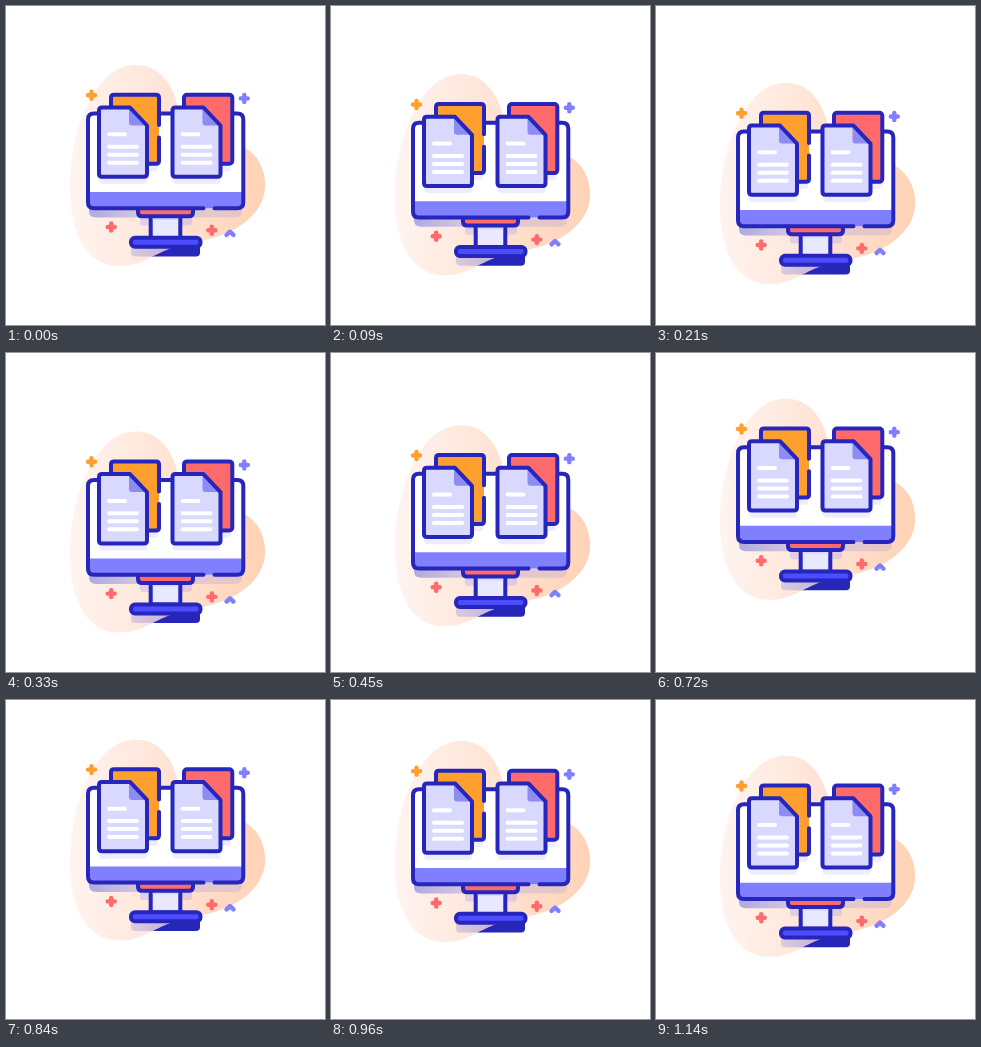
Write an HTML page that moves like this. It is 319 px wide and 319 px high and loops after 1.17 s.

```html
<!DOCTYPE html>
<html lang="en">
<head>
<meta charset="utf-8">
<title>Floating monitor</title>
<style>
  html, body { margin: 0; width: 100%; height: 100%; overflow: hidden; background: #fff; }
  svg { display: block; width: 100vw; height: 100vh; }
  .ink { stroke: #2626bc; stroke-width: 4; stroke-linecap: round; stroke-linejoin: round; }
  .line { fill: none; }
  .text { fill: none; stroke: #fff; stroke-width: 4; stroke-linecap: round; }
  .mark { fill: none; stroke-width: 4.4; stroke-linecap: round; stroke-linejoin: round; }
  .shade { fill: #8080ff; opacity: .24; }
  .faint { fill: #8080ff; opacity: .14; }
</style>
</head>
<body>
<svg viewBox="0 0 319 319" xmlns="http://www.w3.org/2000/svg">
  <defs>
    <linearGradient id="peach" gradientUnits="userSpaceOnUse" x1="64" y1="0" x2="259" y2="0">
      <stop offset="0" stop-color="#fff4f0"/>
      <stop offset=".45" stop-color="#ffe5d8"/>
      <stop offset="1" stop-color="#ffd2b5"/>
    </linearGradient>
    <linearGradient id="cast">
      <stop offset="0" stop-color="#8484d8" stop-opacity=".65"/>
      <stop offset=".4" stop-color="#8484e0" stop-opacity=".28"/>
      <stop offset="1" stop-color="#8484e0" stop-opacity=".2"/>
    </linearGradient>
    <linearGradient id="floor">
      <stop offset="0" stop-color="#8484e0" stop-opacity=".3"/>
      <stop offset=".6" stop-color="#8484d0" stop-opacity=".5"/>
    </linearGradient>
    <path id="blob" d="M130 59C155 59 169 82 173 107C178 132 214 130 238 141.500C251 148 259 162 259 179C259 202 241 219 217 228.500C203 234 184 237 171 240.500C149 246.500 137 260 113 260C78 260 64 222 64 183C64 128 87 59 130 59Z"/>
    <clipPath id="inside"><use href="#blob"/></clipPath>
    <path id="page" d="M96 101.500H124L141 119.500V167.800Q141 170.800 138 170.800H96Q93 170.800 93 167.800V104.500Q93 101.500 96 101.500Z"/>
    <g id="sheet">
      <path class="faint" d="M93 168H141V174Q141 178 137 178H97Q93 178 93 174Z"/>
      <use href="#page" fill="#d9d9ff"/>
      <path fill="#8c8cf4" d="M123 101.500V116.500Q123 119.500 126 119.500H141L124 101.500Z"/>
      <use href="#page" class="ink line"/>
      <path class="text" d="M103 128.300H119M103 140.700H131M103 148.700H131M103 156.700H131"/>
    </g>
  </defs>
  <g id="scene">
    <use href="#blob" fill="url(#peach)"/>

    <rect x="125" y="234" width="69" height="16.500" rx="4" fill="#2626b8"/>
    <g clip-path="url(#inside)">
      <use href="#blob" fill="url(#peach)"/>
      <rect x="125" y="234" width="69" height="16.500" rx="4" fill="url(#floor)"/>
    </g>

    <path fill="url(#cast)" d="M83 200H236V205Q236 211.500 229 211.500H90Q83 211.500 83 205Z"/>
    <rect class="shade" x="134" y="209" width="52" height="10.500" rx="3"/>
    <path class="ink" fill="#e8e8ff" d="M144.700 208H174.300V232H144.700Z"/>
    <path fill="#cfcfff" opacity=".6" d="M146.700 210H172.300V214H146.700Z"/>
    <path class="ink" fill="#ff6b6b" d="M132 202H187V206.300Q187 210.300 183 210.300H136Q132 210.300 132 206.300Z"/>
    <rect class="ink" x="125" y="231.800" width="69.500" height="9" rx="4" fill="#4d4dff"/>

    <rect x="82" y="107.400" width="155.300" height="94.800" rx="6" fill="#fff"/>
    <path fill="#8080ff" d="M82 186H237.300V196.200Q237.300 202.200 231.300 202.200H88Q82 202.200 82 196.200Z"/>
    <path class="ink line" d="M197.500 202.200H88Q82 202.200 82 196.200V113.400Q82 107.400 88 107.400H231.300Q237.300 107.400 237.300 113.400V196.200Q237.300 202.200 231.300 202.200H208.500"/>

    <rect class="faint" x="107" y="155" width="45" height="10" rx="3"/>
    <rect class="faint" x="180" y="155" width="45" height="10" rx="3"/>
    <rect x="105" y="88.800" width="48" height="69" rx="3" fill="#ff9f2e"/>
    <path class="ink line" d="M105 101V91.800Q105 88.800 108 88.800H150Q153 88.800 153 91.800V119M153 131.500V154.800Q153 157.800 150 157.800H141"/>
    <rect class="ink" x="178" y="88.800" width="48.300" height="69" rx="3" fill="#ff6b6b"/>
    <use href="#sheet"/>
    <use href="#sheet" x="73.500"/>

    <g id="marks"></g>
    <path class="mark" stroke="#8080ff" d="M220.500 229L224 225.700L227.500 229"/>
  </g>
</svg>
<script>
  const LOOP = 1170, STEP = 30, SWING = 20;
  const scene = document.getElementById('scene');

  const plus = (x, y, color) =>
    `<path class="mark" stroke="${color}" d="M${x - 3.5} ${y}h7M${x} ${y - 3.5}v7"/>`;

  document.getElementById('marks').innerHTML =
    plus(85.5, 89.2, '#ff9f2e') + plus(238.3, 92.4, '#8080ff') +
    plus(105.2, 221, '#ff6b6b') + plus(205.8, 224.3, '#ff6b6b');

  function draw(ms) {
    const t = Math.floor((ms % LOOP) / STEP) * STEP;
    const y = SWING * Math.sin(2 * Math.PI * t / LOOP);
    scene.setAttribute('transform', `translate(0 ${y.toFixed(3)})`);
  }

  let start;
  function tick(now) {
    start ??= now;
    draw(Math.max(0, now - start));
    requestAnimationFrame(tick);
  }
  draw(0);
  requestAnimationFrame(tick);
</script>
</body>
</html>
```
